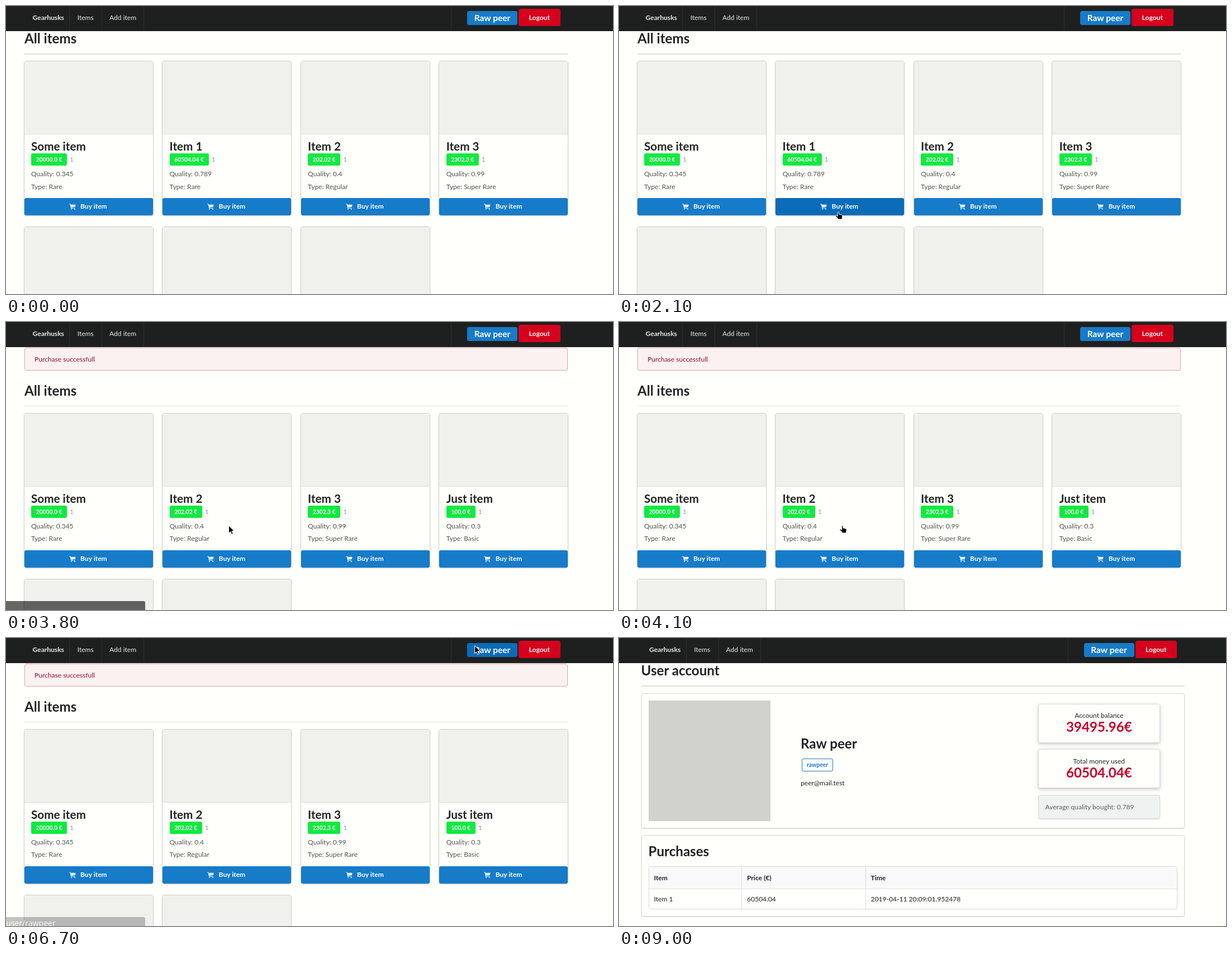
Write an HTML page that moves like this. It is 1086 px wide and 516 px high and loops after 9.6 s.

```html
<!DOCTYPE html>
<html lang="en">
<head>
<meta charset="utf-8">
<title>Item shop</title>
<style>
  html, body { margin: 0; width: 100%; height: 100%; overflow: hidden; }
  body { position: relative; background: #fffffb; color: rgba(0,0,0,.87); font: 12.07px/20px Lato, sans-serif; }
  #stage { position: absolute; left: 0; top: 0; width: 1086px; height: 516px; overflow: hidden; }
  .a, .t, .page, .card > * { position: absolute; box-sizing: border-box; }
  .t { white-space: nowrap; height: 20px; }
  .mid { transform: translateX(-50%); }
  b, h1, h2 { font-weight: 700; margin: 0; }
  h1 { font-size: 24.14px; }
  .page { left: 0; top: 0; width: 1086px; height: 516px; }
  #account { left: 6.5px; }

  #nav { left: 0; top: 0; width: 1086px; height: 44.5px; background: #1e201f; color: rgba(255,255,255,.9); border-bottom: 1px solid #141517; }
  #links { left: 0; top: 0; }
  #links i { position: absolute; top: 0; width: 1px; height: 43.5px; background: #2d2f2e; }
  .btn { border-radius: 3.5px; background: #167bc9; color: #fff; font-weight: 700; text-align: center; }
  #user { left: 825px; top: 9px; width: 90px; height: 25px; font-size: 15.5px; line-height: 24px; }
  #logout { left: 917px; top: 5px; width: 74.5px; height: 31px; line-height: 31px; background: #d7001c; }

  .hr { left: 32.5px; width: 972.5px; height: 1.5px; background: #e0e1de; }
  #shop { position: absolute; left: 0; top: 0; }
  #msg { left: 32.5px; top: 46px; width: 972.5px; height: 40.5px; border: 1px solid #dba6ab; border-radius: 3px;
         background: #fcf1f1; color: #9a0d33; padding-left: 17.5px; line-height: 39px; }
  #grid { left: 32.5px; top: 99px; display: grid; grid-template-columns: repeat(4, 230px); grid-auto-rows: 276px; gap: 21px 17.55px; }
  .card { position: relative; border-radius: 3.5px; box-shadow: 0 1px 3px #c9cac7, 0 0 0 .9px #d0d1ce; }
  .card .pic { left: 0; top: 0; width: 230px; height: 131px; border-radius: 3.5px 3.5px 0 0; background: #f0f0ed; border-bottom: 1px solid #dfe0dd; }
  .card > h2, .card > p, .card .tag { left: 12.5px; white-space: nowrap; margin: 0; }
  .card > h2 { top: 142px; font-size: 20.7px; }
  .card .tag { top: 165px; display: flex; line-height: 22px; color: rgba(0,0,0,.4); }
  .tag b { background: #10ea40; color: #fffffb; border-radius: 3px; font-size: 10.34px; padding: 0 8.6px; margin-right: 5px; }
  .card > p { color: rgba(0,0,0,.68); }
  .card .btn { left: 0; top: 245px; width: 230px; height: 31px; border-radius: 3px; line-height: 30.5px; text-align: left; padding-left: 100.5px; }
  .card svg { position: absolute; left: 80px; top: 10px; opacity: .88; }

  .box { border: 1px solid #d8d9d7; border-radius: 3.5px; background: #fffffc; box-shadow: 0 1px 2px rgba(34,36,38,.15); }
  .raised { box-shadow: 0 2px 4px rgba(34,36,38,.12), 0 2px 9px rgba(34,36,38,.15); }
  .sum { color: #c8002d; font-size: 24.14px; }
  #nick { left: 320.5px; top: 216px; height: 23px; border: 1px solid #1f78bd; border-radius: 3px; color: #1f78bd;
          font-size: 10.34px; line-height: 21px; padding: 0 8px; }
  #status { left: 0; top: 500px; width: 248.5px; height: 20px; border-radius: 0 3px 0 0; background: #000; color: #fff;
            font: 14px/22px "Noto Sans", sans-serif; white-space: nowrap; }
  #cursor { left: 0; top: 0; width: 24px; height: 24px; overflow: visible; }
</style>
</head>
<body>
<div id="stage">
  <div class="page" id="market">
    <div class="a" id="msg">Purchase successfull</div>
    <div id="shop">
      <h1 class="t" style="left:33px;top:48px">All items</h1>
      <div class="a hr" style="top:85px"></div>
      <div class="a" id="grid"></div>
    </div>
  </div>
  <div class="page" id="account"></div>
  <div class="a" id="nav"><div class="a" id="links">
    <b class="t" style="left:47.5px;top:10.5px">Gearhusks</b>
    <span class="t" style="left:127.7px;top:10.5px">Items</span>
    <span class="t" style="left:185px;top:10.5px">Add item</span>
    <i style="left:113px"></i><i style="left:171px"></i><i style="left:246px"></i><i style="left:796px"></i>
    <div class="a btn" id="user">Raw peer</div>
    <div class="a btn" id="logout">Logout</div>
  </div></div>
  <div class="a" id="status"></div>
  <svg class="a" id="cursor" stroke="#fff" stroke-width="1" stroke-linejoin="round">
    <path id="arrow" d="M.5 .5V14.6L3.7 11.6L5.9 16.5L8.2 15.5L6 10.7H10.2Z"/>
    <path id="hand" d="M.6 1.6Q1.8 -.2 3 1.6V5L7.6 6.2Q9.4 6.8 9.2 8.6L8.6 11.6V14H1V12.4L-3.2 8.4Q-3.6 6.6 -1.6 7L.6 8.6Z"/>
  </svg>
</div>
<script>
const LOOP = 9600, STEP = 100;
const $ = id => document.getElementById(id);

const items = [
  ['Some item', '20000.0', '0.345', 'Rare'],
  ['Item 1', '60504.04', '0.789', 'Rare'],
  ['Item 2', '202.02', '0.4', 'Regular'],
  ['Item 3', '2302.3', '0.99', 'Super Rare'],
  ['Just item', '100.0', '0.3', 'Basic'],
  ['Item 4', '150.0', '0.5', 'Basic'],
  ['Item 5', '310.0', '0.6', 'Rare']
];
const cart = `<svg width="12" height="11" fill="#fff"><path d="M0 .4H2.4L2.8 1.7H11.6L11 6L3.9 6.9L4 7.7H10.6V8.7H3.1L1.7 1.4H0Z"/>
  <circle cx="4" cy="9.9" r="1"/><circle cx="9.8" cy="9.9" r="1"/></svg>`;

$('grid').innerHTML = items.map(([name, price, quality, type]) => `<div class="card">
  <div class="pic"></div><h2>${name}</h2>
  <div class="tag"><b>${price} €</b>1</div>
  <p style="top:192px">Quality: ${quality}</p><p style="top:214.5px">Type: ${type}</p>
  <div class="btn">${cart}Buy item</div></div>`).join('');

const text = (x, y, s, tag = 'span', cls = '') =>
  `<${tag} class="t ${cls}" style="left:${x}px;top:${y - 10}px">${s}</${tag}>`;
const box = (x, y, w, h, cls = 'box', css = '') =>
  `<div class="a ${cls}" style="left:${x}px;top:${y}px;width:${w}px;height:${h}px;${css}"></div>`;
const line = 'background:#dfe0de';

$('account').innerHTML = [
  text(33, 58, 'User account', 'h1'),
  box(32.5, 85, 972.5, 1.5, 'hr'),
  box(33, 99, 972.5, 242),
  box(46, 112, 218.5, 216, '', 'background:#d1d2ce'),
  text(318.5, 188.5, 'Raw peer', 'h1'),
  '<b class="a" id="nick">rawpeer</b>',
  text(318.5, 259.5, 'peer@mail.test'),
  box(743, 117.5, 218.5, 70, 'box raised'),
  text(852.3, 139, 'Account balance', 'span', 'mid'),
  text(852.3, 159, '39495.96€', 'b', 'mid sum'),
  box(743, 199, 218.5, 70, 'box raised'),
  text(852.3, 221, 'Total money used', 'span', 'mid'),
  text(852.3, 241, '60504.04€', 'b', 'mid sum'),
  box(743, 281, 218.5, 43, 'box', 'background:#f0f1f1'),
  text(756, 303, '<span style="opacity:.7">Average quality bought: 0.789</span>'),
  box(33, 353, 972.5, 146),
  text(46, 382, 'Purchases', 'h1'),
  box(46, 409, 946.5, 77, 'box', 'box-shadow:none'),
  box(47, 410, 944.5, 39, '', 'background:#f8f9f8'),
  box(47, 449, 944.5, 1, '', line),
  box(212.5, 410, 1, 75, '', line),
  box(434.5, 410, 1, 75, '', line),
  text(56, 430, 'Item', 'b'), text(222.5, 430, 'Price (€)', 'b'), text(444, 430, 'Time', 'b'),
  text(56, 468, 'Item 1'), text(222.5, 468, '60504.04'), text(444, 468, '2019-04-11 20:09:01.952478')
].join('');

// pointer: time, x, y
const path = [
  [600, 37, 264], [700, 150, 236], [800, 262, 223], [900, 343, 235], [1100, 343, 235],
  [1200, 343, 271], [1800, 387, 370], [2000, 387, 370], [2300, 398, 364], [5100, 398, 364],
  [6000, 838, 13], [6700, 838, 13], [6800, 852, 12], [6900, 852, 12], [7000, 760, 130],
  [7100, 663, 247], [7600, 663, 247], [7700, 639, 281], [8100, 499, 458], [8300, 499, 458],
  [8400, 480, 436], [8500, 480, 436], [8900, 193, 17], [9000, 193, 17]
];
// values that hold until the next entry
const blue = '#167bc9', hover = '#0a6cb9';
const pointer = [[0, 'arrow'], [1700, 'hand'], [3000, 'arrow'], [4100, 'hand'], [5200, 'arrow'], [5900, 'hand'], [6600, 'arrow']];
const buyColor = [[0, blue], [1700, hover], [2900, '#085a9c'], [3000, '#0765b2'], [3800, blue]];
const userColor = [[0, blue], [5900, hover], [6800, blue]];
const bubble = [[0, 0], [3200, 1], [3800, .6], [3900, .25], [4000, 0], [5900, .5], [6000, 1], [6600, .6], [6700, .23], [6800, 0]];

const held = (list, t) => list.findLast(e => e[0] <= t)[1];
function along(t) {
  const i = path.findIndex(p => p[0] > t);
  if (i < 1) return null;
  const [t0, x0, y0] = path[i - 1], [t1, x1, y1] = path[i], k = (t - t0) / (t1 - t0);
  return [x0 + (x1 - x0) * k, y0 + (y1 - y0) * k];
}
const show = (el, on) => { el.style.display = on ? '' : 'none'; };
const cards = [...document.querySelectorAll('.card')];
const buy = cards[1].querySelector('.btn');

function draw(ms) {
  const t = Math.floor(ms % LOOP / STEP) * STEP;
  const bought = t >= 3800, account = t >= 6800;
  show($('market'), !account);
  show($('account'), account);
  show($('msg'), bought);
  show(cards[1], !bought);
  $('shop').style.top = bought ? '64.7px' : '0';
  $('links').style.left = account ? '6.5px' : '0';
  buy.style.background = held(buyColor, t);
  $('user').style.background = held(userColor, t);
  $('status').style.opacity = held(bubble, t);
  $('status').textContent = t >= 5900 ? 'user/rawpeer' : '';
  const pos = along(t), kind = held(pointer, t);
  show($('cursor'), pos);
  if (pos) $('cursor').style.transform = `translate(${pos[0]}px, ${pos[1]}px)`;
  for (const id of ['arrow', 'hand']) show($(id), id === kind);
}

let start;
function tick(now) {
  start ??= now;
  draw(now - start);
  requestAnimationFrame(tick);
}
draw(0);
requestAnimationFrame(tick);
</script>
</body>
</html>
```
